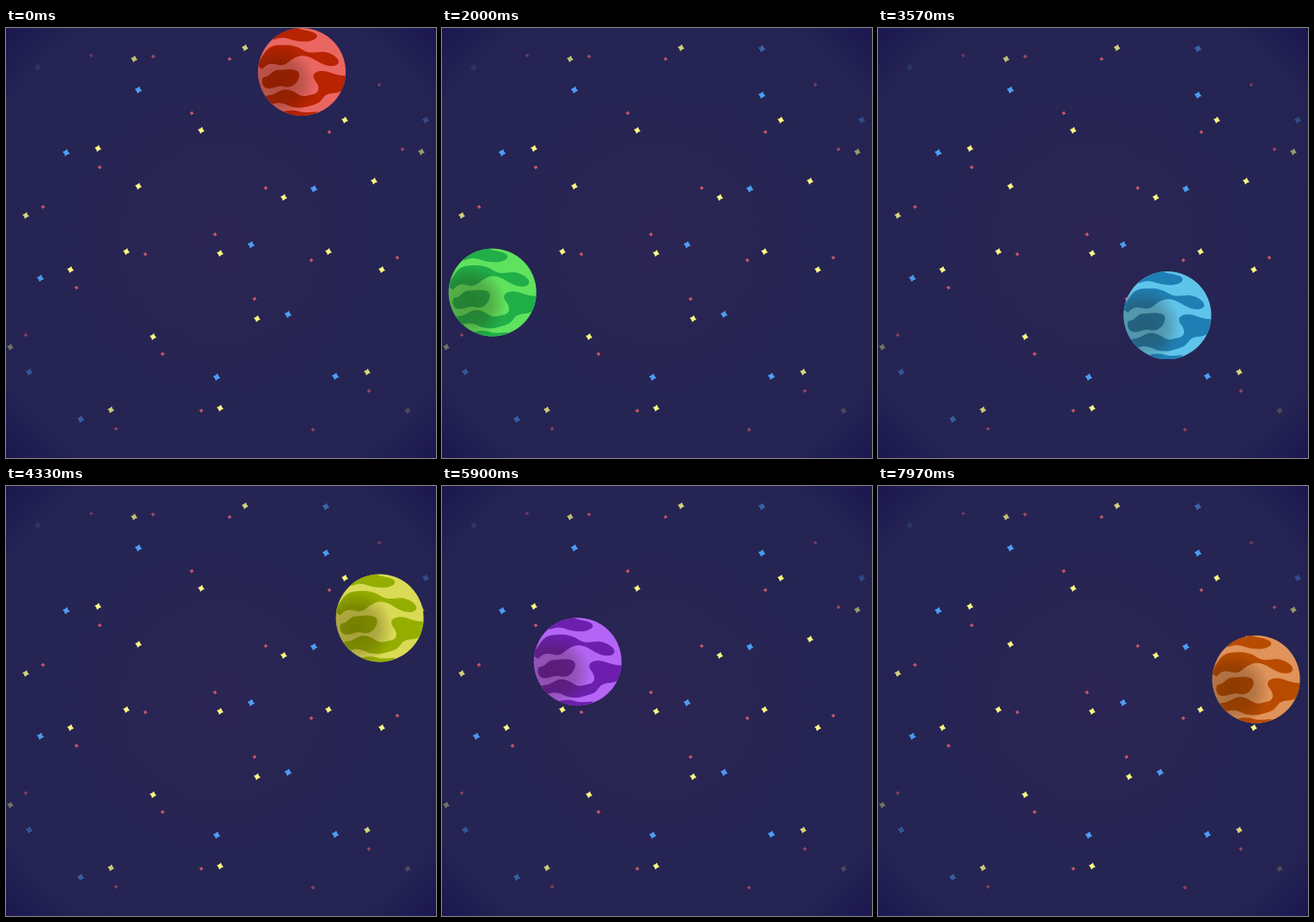
Write an HTML page that moves like this. It is 500 px wide and 500 px high and loops after 8 s.

```html
<!DOCTYPE html>
<html lang="en">
<head>
<meta charset="utf-8">
<title>Bouncing planet</title>
<style>
  html, body { margin: 0; height: 100%; overflow: hidden; background: #252453; }
  svg { display: block; width: 100vw; height: 100vh; }
</style>
</head>
<body>
<svg viewBox="0 0 500 500">
  <defs>
    <radialGradient id="sky" cx="250" cy="250" r="350" gradientUnits="userSpaceOnUse">
      <stop offset="0" stop-color="#2b2553"/>
      <stop offset=".6" stop-color="#252453"/>
      <stop offset=".85" stop-color="#242353"/>
      <stop offset="1" stop-color="#1b1850"/>
    </radialGradient>
    <radialGradient id="shade" cx="-28" cy="12" r="44" gradientUnits="userSpaceOnUse">
      <stop offset="0" stop-color="#301800" stop-opacity=".32"/>
      <stop offset=".6" stop-color="#301800" stop-opacity=".24"/>
      <stop offset="1" stop-color="#301800" stop-opacity="0"/>
    </radialGradient>
    <clipPath id="disc"><circle r="51"/></clipPath>
  </defs>
  <rect width="500" height="500" fill="url(#sky)"/>
  <g id="stars"></g>
  <g id="planet">
    <circle id="base" r="51"/>
    <g clip-path="url(#disc)">
      <g id="bands">
        <path d="M-33-37C-25-41-20-40-14-38S2-34 10-36S21-43 13-46S-2-48-8-53L-30-53Z"/>
        <path d="M-53-8C-43-20-42-30-28-31S-8-31 2-25S20-26 31-22S46-11 40-8S25-8 17-13S2-21-7-17S-18-6-27-8S-40-10-46-3Z"/>
        <path d="M-44 6C-38 7-35-2-28-2S-16-4-8-2S-3 8-6 12S-14 19-21 17S-35 21-41 19S-48 8-44 6Z"/>
        <path d="M54 4C40 6 32-2 22-1S12 6 16 11S22 24 13 26S2 30-6 25S-20 19-27 23S-36 27-43 28L-36 38C-28 35-22 36-16 39S-2 43 8 40S20 37 25 30S38 26 44 23L54 20Z"/>
        <path d="M-26 48C-18 44-10 44-3 46S10 47 18 46L12 54H-20Z"/>
      </g>
      <circle r="51" fill="url(#shade)"/>
    </g>
  </g>
</svg>
<script>
const LOOP = 8000;
const byId = id => document.getElementById(id);

const starKinds = [
  { color: '#fdfb82', size: 4, at: [
    149,36, 278,23, 394,107, 227,119, 107,140, 483,144, 154,184, 428,178, 323,197, 23,218, 140,260,
    249,262, 375,260, 75,281, 437,281, 292,338, 171,359, 5,371, 420,400, 122,444, 249,442, 467,445] },
  { color: '#4c9ef4', size: 4.4, at: [
    154,72, 372,24, 372,78, 37,46, 488,107, 70,145, 358,187, 285,252, 40,291, 328,333, 27,400,
    245,406, 383,405, 87,455] },
  { color: '#c9566a', size: 2.6, at: [
    99,32, 171,33, 260,36, 434,66, 216,99, 376,121, 109,162, 461,141, 302,186, 43,208, 243,240,
    162,263, 355,270, 455,267, 82,302, 289,315, 23,357, 182,379, 227,445, 422,422, 128,466, 357,467] }
];

// Four-pointed stars, dimmer towards the corners.
function starMarkup(x, y, size, color) {
  const distance = Math.hypot(x - 250, y - 250);
  const alpha = Math.min(1, Math.max(.12, (310 - distance) / 100));
  const points = Array.from({ length: 8 }, (_, i) => {
    const angle = i * Math.PI / 4 + .25;
    const radius = i % 2 ? size * .6 : size;
    return [x + radius * Math.cos(angle), y + radius * Math.sin(angle)].map(v => v.toFixed(2));
  });
  return `<polygon points="${points.join(' ')}" fill="${color}" opacity="${alpha.toFixed(2)}"/>`;
}

byId('stars').innerHTML = starKinds.map(({ color, size, at }) =>
  at.map((x, i) => i % 2 ? '' : starMarkup(x, at[i + 1], size, color)).join('')).join('');

// Each leg starts at a wall: time, position, light and dark colour.
const legs = [
  { t: 0, x: 344, y: 51, light: '#ea6661', dark: '#b82300' },
  { t: 1958, x: 51, y: 302, light: '#5fe25e', dark: '#1fae48' },
  { t: 3105, x: 261, y: 449, light: '#5fc4ea', dark: '#1f7fb4' },
  { t: 4262, x: 449, y: 163, light: '#d9da55', dark: '#94ae00' },
  { t: 5060, x: 280, y: 51, light: '#b565f6', dark: '#6c1fae' },
  { t: 6634, x: 51, y: 338, light: '#e566b6', dark: '#b51aa6' },
  { t: 7090, x: 165, y: 449, light: '#e0935a', dark: '#b84b00' },
  { t: 8000, x: 449, y: 217 }
];

function draw(now) {
  // Motion advances in 30 steps per second, on a 10 ms grid.
  const step = Math.floor((now % LOOP + 3.4) * .03);
  const time = Math.min(10 * Math.round(step / .3), LOOP - 1);
  const next = legs.findIndex(leg => leg.t > time);
  const from = legs[next - 1], to = legs[next];
  const part = (time - from.t) / (to.t - from.t);
  const x = from.x + (to.x - from.x) * part;
  const y = from.y + (to.y - from.y) * part;
  byId('planet').setAttribute('transform', `translate(${x} ${y})`);
  byId('base').setAttribute('fill', from.light);
  byId('bands').setAttribute('fill', from.dark);
}

const start = performance.now();
function tick() {
  draw(performance.now() - start);
  requestAnimationFrame(tick);
}
tick();
</script>
</body>
</html>
```
